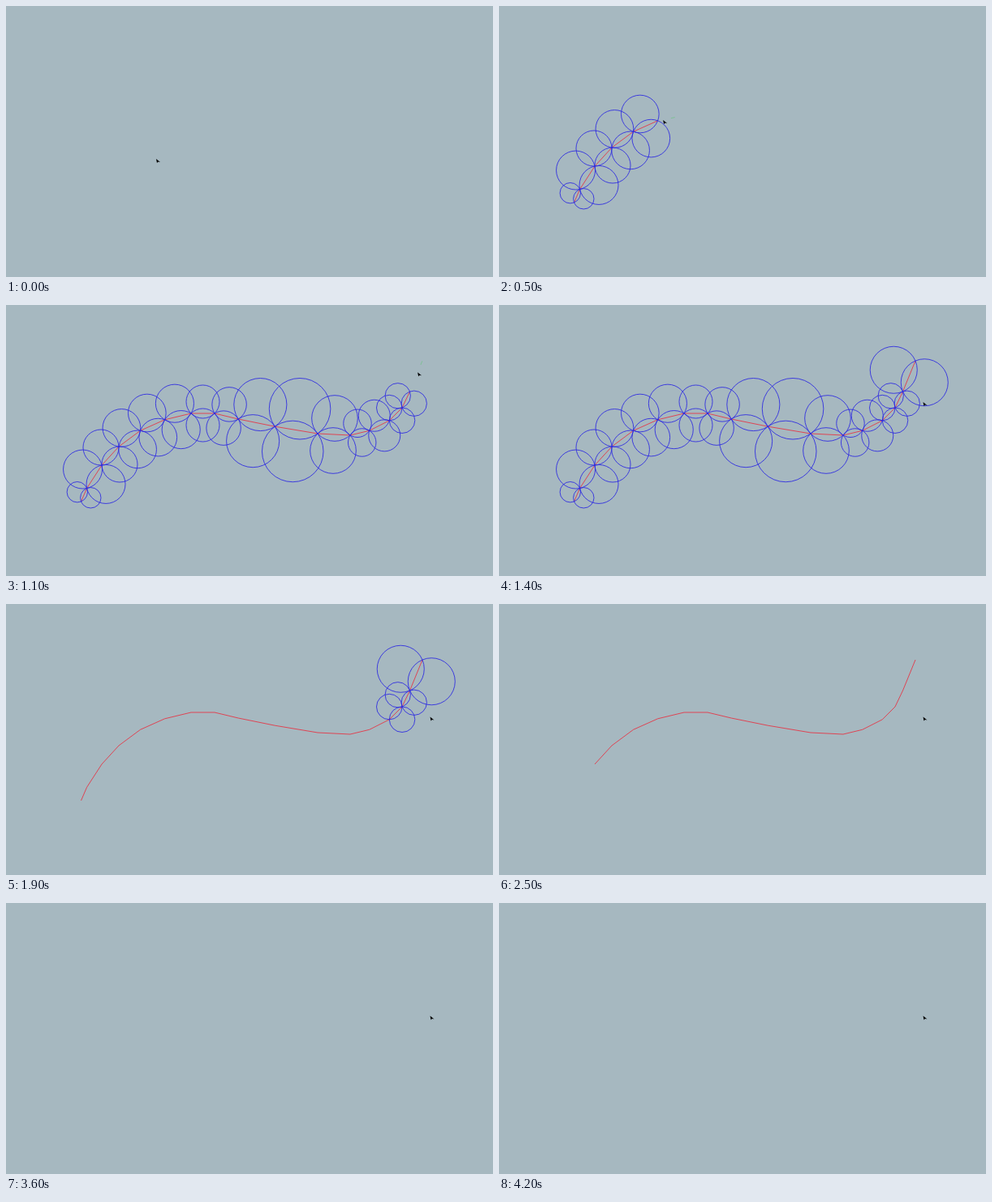
An HTML page with a canvas that plays this animation: 600 by 335 pixels, repeating every 4.3 s.

```html
<!DOCTYPE html>
<html lang="en">
<head>
<meta charset="utf-8">
<title>Curve with paired circles</title>
<style>
  html, body { margin: 0; width: 100%; height: 100%; overflow: hidden; background: #a6b8c0; }
  canvas { display: block; }
</style>
</head>
<body>
<canvas id="stage" width="600" height="335"></canvas>
<script>
const ctx = document.getElementById('stage').getContext('2d');
const LOOP = 4300, STEP = 100;
const DRAW_START = 200, DRAW_PER_SEGMENT = 57.5;
const CIRCLES_FADE = 1400, LINE_FADE = 2423, ERASE_PER_SEGMENT = 38.4;

const path = [
  [92.5, 243], [99.6, 226.5], [118, 198], [139, 175], [165.5, 155.3], [195.6, 141.8],
  [228, 134], [257, 134], [286.2, 141], [331.3, 150.2], [384, 159], [424, 161],
  [447.7, 155.3], [472.3, 142.8], [488, 127], [497.5, 107], [513, 69]
];
const segments = path.length - 1;
const drawEnd = DRAW_START + segments * DRAW_PER_SEGMENT;

const clamp = (v, lo, hi) => Math.min(hi, Math.max(lo, v));
const mix = (a, b, k) => [a[0] + (b[0] - a[0]) * k, a[1] + (b[1] - a[1]) * k];

// Whole segments passed since a start time
const passed = (t, start, duration) =>
  clamp(Math.floor((t - start) / duration + 0.01), 0, segments);

function along(p) {
  const i = clamp(Math.floor(p), 0, segments - 1);
  return mix(path[i], path[i + 1], p - i);
}

function cursorAt(t) {
  if (t < DRAW_START) return mix([185, 189], path[0], t / DRAW_START);
  if (t < drawEnd) {
    const [x, y] = along((t - DRAW_START) / DRAW_PER_SEGMENT);
    return [x - 0.5, y + 1];
  }
  if (t < 1400) return mix(path[segments], [522.5, 120], clamp((t - 1200) / 200, 0, 1));
  return mix([522.5, 120], [522.5, 139.5], clamp((t - 1400) / 100, 0, 1));
}

function polyline(points, color) {
  ctx.strokeStyle = color;
  ctx.beginPath();
  points.forEach(([x, y]) => ctx.lineTo(x, y));
  ctx.stroke();
}

// Two circles through both ends of a segment, one on each side
function circlePair([x1, y1], [x2, y2]) {
  const dx = (x2 - x1) / 2, dy = (y2 - y1) / 2;
  const radius = Math.hypot(dx, dy) * Math.SQRT2;
  ctx.strokeStyle = '#2a26e2';
  for (const side of [-1, 1]) {
    ctx.beginPath();
    ctx.arc(x1 + dx - side * dy, y1 + dy + side * dx, radius, 0, Math.PI * 2);
    ctx.stroke();
  }
}

function drawCursor([x, y]) {
  ctx.fillStyle = '#000';
  ctx.beginPath();
  [[0, 0], [1, 5], [2.5, 3.5], [5, 4]].forEach(([dx, dy]) => ctx.lineTo(x + dx, y + dy));
  ctx.fill();
}

function render(t) {
  ctx.fillStyle = '#a6b8c0';
  ctx.fillRect(0, 0, 600, 335);
  ctx.lineWidth = 0.85;

  const drawn = passed(t, DRAW_START, DRAW_PER_SEGMENT);
  const lineFrom = passed(t, LINE_FADE, ERASE_PER_SEGMENT);
  if (lineFrom < drawn) polyline(path.slice(lineFrom, drawn + 1), '#e83040');
  for (let i = passed(t, CIRCLES_FADE, ERASE_PER_SEGMENT); i < drawn; i++) {
    circlePair(path[i], path[i + 1]);
  }

  const cursor = cursorAt(t);
  if (t > DRAW_START && t < drawEnd) {
    const [a, b] = [path[drawn], path[drawn + 1]];
    const length = Math.hypot(b[0] - a[0], b[1] - a[1]);
    const ahead = d => mix(cursor, [cursor[0] + b[0] - a[0], cursor[1] + b[1] - a[1]], d / length);
    polyline([ahead(10), ahead(15)], 'rgba(90, 200, 110, 0.6)');
  }
  drawCursor(cursor);
}

function tick() {
  const t = performance.now() % LOOP;
  render(Math.floor(t / STEP) * STEP);
  requestAnimationFrame(tick);
}
tick();
</script>
</body>
</html>
```
